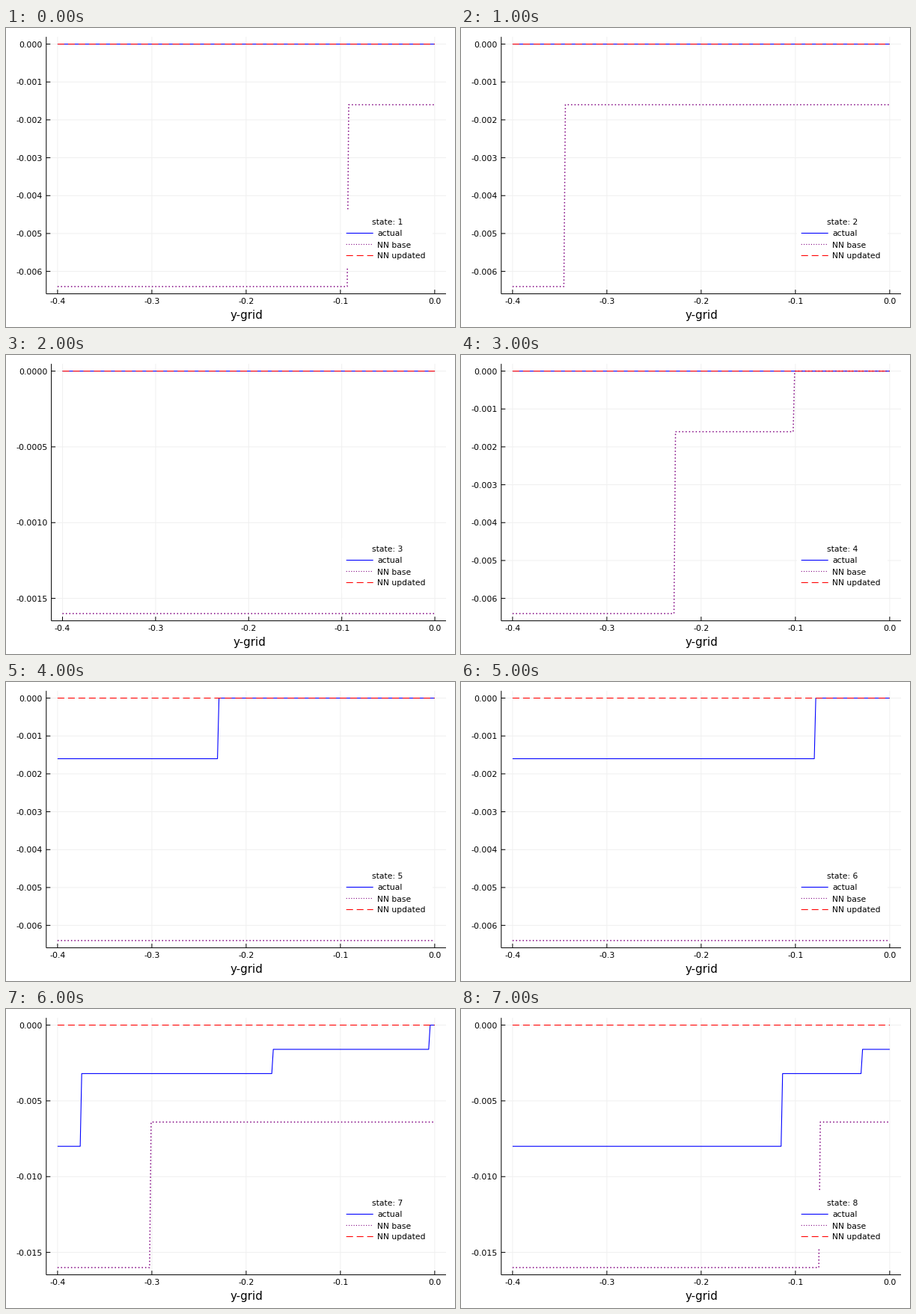
These frames come from a looping animation (600 by 400 pixels, 8000 ms). A matplotlib script:

```python
import math

import matplotlib.pyplot as plt
import numpy as np
from matplotlib.animation import FuncAnimation
from matplotlib.patches import Rectangle

W, H, DPI = 600, 400, 100
PT = 72 / DPI
TOP, BOTTOM, RIGHT = 11.8, 355.6, 588
PAD = 0.03 / 1.06
UNIT = 0.0016
GRID_X = np.linspace(-0.4, 0, 251)
DOTS = (0, (1, 2))
DASHES = (0, (8.2, 4.5))

# Per state: starting rung, then the y-grid points where the curve climbs a rung.
BASE = [(2, -0.092), (2, -0.345), (1,), (2, -0.228, -0.102),
        (2,), (2,), (3, -0.302), (3, -0.074)]
ACTUAL = [(0,)] * 4 + [(1, -0.230), (1, -0.079),
                       (3, -0.375, -0.172, -0.006), (3, -0.114, -0.030)]

plt.rcParams["font.family"] = "DejaVu Sans"
plt.rcParams["path.snap"] = False
fig = plt.figure(figsize=(W / DPI, H / DPI), dpi=DPI, facecolor="white")
ax = fig.add_axes([0, 0, 1, 1])


def line(xs, ys, color, width=1.0, style="-", z=2):
    ax.plot(xs, ys, color=color, lw=width * PT, ls=style, zorder=z,
            solid_capstyle="butt")


def label(x, y, text, size=11, ha="center"):
    ax.text(x, y, text, fontsize=size * PT, ha=ha, va="baseline",
            color="black", zorder=6)


def rungs(start, *breaks):
    return start - sum((GRID_X > b).astype(int) for b in breaks) + 0 * GRID_X


def loss(rung):
    """Tetrahedral ladder 0, 1, 4, 10."""
    return rung * (rung + 1) * (rung + 2) / 6


def tick_step(low):
    """Largest 1 or 5 times a power of ten that gives three or more intervals."""
    power = math.floor(math.log10(low / 3))
    step = 10.0 ** power
    return (5 * step if 5 * step <= low / 3 else step), -power


def draw_legend(state):
    ax.add_patch(Rectangle((449, 244.5), 121, 75, fc="white", ec="none", zorder=5))
    label(509.5, 263, f"state: {state}", 10.8)
    rows = [("actual", "blue", "-"), ("NN base", "purple", DOTS),
            ("NN updated", "red", DASHES)]
    for i, (name, color, style) in enumerate(rows):
        y = 274.5 + 15 * i
        line([454.7, 490.7], [y, y], color, 1.1, style, z=6)
        label(496, y + 4, name, 10.8, "left")


def draw_axes(left, low, step, decimals, px, py):
    for k in range(5):
        x = px(-0.1 * k)
        line([x, x], [TOP, BOTTOM], "#f0f0f0", z=1)
        line([x, x], [BOTTOM - 5.5, BOTTOM], "black")
        label(x, 369, f"{'-' if k else ''}{0.1 * k:.1f}")
    for k in range(int(low / step) + 1):
        y = py(step * k)
        line([left, RIGHT], [y, y], "#f0f0f0", z=1)
        line([left, left + 5.5], [y, y], "black")
        label(left - 5, y + 4, f"{'-' if k else ''}{step * k:.{decimals}f}", ha="right")
    line([left, left], [TOP, BOTTOM], "black")
    line([left, RIGHT], [BOTTOM, BOTTOM], "black")
    label((left + RIGHT) / 2 + 0.7, 389, "y-grid", 15)


def draw(frame):
    ax.clear()
    ax.set_xlim(0, W)
    ax.set_ylim(H, 0)
    ax.axis("off")

    base = loss(rungs(*BASE[frame]))
    actual = (loss(rungs(*ACTUAL[frame])) + 1) // 2
    low = base.max() * UNIT
    step, decimals = tick_step(low)
    left = 33.4 + 6.8 * decimals
    width, height = RIGHT - left, BOTTOM - TOP

    def px(x):
        return RIGHT - width * (PAD - x / 0.4 * (1 - 2 * PAD))

    def py(depth):
        return TOP + height * (PAD + depth / low * (1 - 2 * PAD))

    draw_axes(left, low, step, decimals, px, py)
    xs = px(GRID_X)
    line(xs, py(actual * UNIT), "blue", 1.1, z=3)
    line(xs, py(base * UNIT), "purple", 1.5, DOTS, z=3)
    line(xs, py(0 * GRID_X), "red", 1.1, DASHES, z=4)
    draw_legend(frame + 1)
    return ax.get_children()


anim = FuncAnimation(fig, draw, frames=len(BASE), init_func=lambda: draw(0),
                     interval=1000, repeat=True, repeat_delay=0, blit=False)
plt.show()
```
